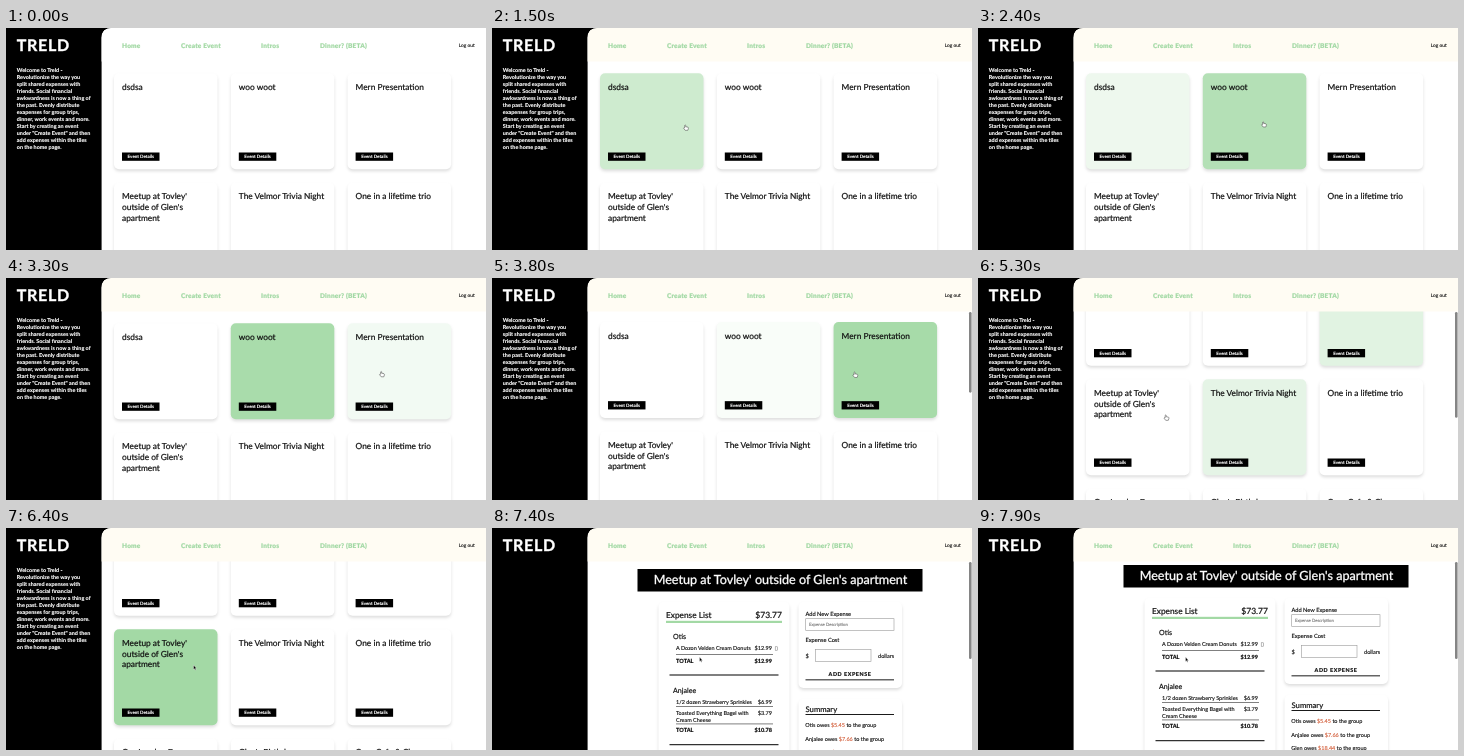
An HTML page for the animation above (8 s loop, 480x222 px).

```html
<!DOCTYPE html>
<html lang="en">
<meta charset="utf-8">
<title>Shared expenses</title>
<style>
  html, body { margin: 0; width: 100%; height: 100%; overflow: hidden; background: #000; }
  svg { display: block; width: 480px; height: 222px; }
  text { font-family: Lato, sans-serif; text-rendering: geometricPrecision; white-space: pre; }
  .panel { fill: #fff; filter: drop-shadow(0 2px 1.8px rgba(0, 0, 0, .13)); }
</style>
<body>
<script>
const GREEN = '#a3d9a5';
const GREEN_RGB = [163, 217, 165];
const LOOP = 8000;

// A hairline stroke gives the text a medium weight
const text = (x, y, str, size, weight = 400, fill = '#111', attrs = '') =>
  `<text x="${x}" y="${y}" font-size="${size}" font-weight="${weight}" fill="${fill}"
    stroke="${fill}" stroke-width="${size * .025}" ${attrs}>${str}</text>`;
const lines = (x, y, str, size, leading, weight, fill) =>
  str.split('|').map((s, i) => text(x, y + i * leading, s, size, weight, fill)).join('');
const rect = (x, y, w, h, attrs = '') =>
  `<rect x="${x}" y="${y}" width="${w}" height="${h}" ${attrs}/>`;
const panel = (x, y, w, h) => rect(x, y, w, h, 'rx="5" class="panel"');
const field = (x, y, w, h) => rect(x, y, w, h, 'fill="#fff" stroke="#999" stroke-width=".6"');
const END = 'text-anchor="end"';
const MIDDLE = 'text-anchor="middle"';

const titles = ["dsdsa", "woo woot", "Mern Presentation",
  "Meetup at Tovley'|outside of Glen's|apartment", "The Velmor Trivia Night", "One in a lifetime trio",
  "Our London Dance", "Glen's Birthday", "Cozy Cafe &amp; Chess"];

const card = (title, i) => {
  const x = 108 + i % 3 * 116.8, y = 45.3 + Math.floor(i / 3) * 109.5;
  return rect(x, y, 103.5, 96, 'rx="5" class="panel card"') +
    lines(x + 8, y + 16.6, title, 8.35, 10.7) +
    rect(x + 8, y + 79.2, 37.5, 8.3) +
    text(x + 26.8, y + 85, 'Event Details', 4.5, 700, '#fff', MIDDLE);
};

const price = (y, amount, weight) => text(280, y, amount, 5.6, weight, '#111', END);
const item = (y, name, amount) => lines(184, y, name, 5.5, 7) + price(y, amount);
const total = (y, amount) => rect(184, y - 8.5, 97, .5) +
  text(184, y, 'TOTAL', 5.6, 800) + price(y, amount, 800) + rect(177.5, y + 12, 109, 1);
const owes = (y, name, amount) => text(313.3, y,
  `${name} owes <tspan fill="#d4623f" stroke="#d4623f">${amount}</tspan> to the group`, 5.5);

const eventPage = rect(145.5, 37, 285, 22.5) +
  text(288.5, 52.4, "Meetup at Tovley' outside of Glen's apartment", 12.6, 400, '#fff', MIDDLE) +
  panel(166.5, 70, 131, 190) +
  text(174, 86.3, 'Expense List', 8.3) + text(290, 86.3, '$73.77', 8.5, 400, '#111', END) +
  rect(174, 88.8, 116, 2.2, `fill="${GREEN}"`) +
  text(181, 107.3, 'Otis', 7.1) + item(118.3, 'A Dozon Velden Cream Donuts', '$12.99') +
  rect(283.2, 114.8, 2.2, 3.4, 'fill="none" stroke="#777" stroke-width=".5"') +
  total(130.5, '$12.99') +
  text(181, 160.5, 'Anjalee', 7.1) + item(172, '1/2 dozen Strawberry Sprinkles', '$6.99') +
  rect(184, 174.3, 97, .5) + item(182.5, 'Toasted Everything Bagel with|Cream Cheese', '$3.79') +
  total(200.2, '$10.78') +
  panel(306.5, 70, 103.5, 86) +
  text(313.5, 83.5, 'Add New Expense', 5.7) + field(313.7, 86.7, 88.3, 11.6) +
  text(317, 94.2, 'Expense Description', 4.3, 400, '#777') +
  text(313.5, 110, 'Expense Cost', 5.7) + text(313.5, 125.6, '$', 5.7) + field(323.3, 117.3, 55.7, 12) +
  text(386, 125.6, 'dollars', 5.6) +
  text(358, 143.7, 'ADD EXPENSE', 5.4, 800, '#111', MIDDLE + ' letter-spacing=".55"') +
  rect(313.5, 147.4, 88.5, .9) +
  panel(306.5, 167, 103.5, 90) + text(313.5, 179.5, 'Summary', 7.7) + rect(313.5, 182, 88.5, .9) +
  owes(195, 'Otis', '$5.45') + owes(208.5, 'Anjalee', '$7.66') + owes(222, 'Glen', '$18.44');

const intro = `Welcome to Treld -|Revolutionize the way you|split shared expenses with|friends. Social financial|\
awkwardness is now a thing of|the past. Evenly distribute|exapenses for group trips,|dinner, work events and more.|\
Start by creating an event|under "Create Event" and then|add expenses within the tiles|on the home page.`;

const nav = [[116, 'Home'], [175, 'Create Event'], [255, 'Intros'], [314, 'Dinner? (BETA)']]
  .map(([x, s]) => text(x, 20, s, 6.5, 900, GREEN, 'letter-spacing=".18"')).join('');

document.body.innerHTML = `<svg viewBox="0 0 480 222">
  <clipPath id="sheet"><path d="M95.6 222V10Q95.6 0 105.6 0H480V222Z"/></clipPath>
  <rect width="480" height="222"/>
  ${text(10.8, 23.3, 'TRELD', 16, 700, '#fff', 'letter-spacing=".7"')}
  <g id="intro">${lines(10.8, 44, intro, 5.45, 7, 700, '#fff')}</g>
  <g clip-path="url(#sheet)">
    <rect x="95" width="385" height="222" fill="#fff"/>
    <g id="home">${titles.map(card).join('')}</g>
    <g id="event">${eventPage}</g>
    <rect id="header" x="95" width="385" height="33.5"/>
    ${nav}${text(452.8, 18.8, 'Log out', 4.8)}
    <rect id="bar" x="477" y="34" width="2.6" rx="1.3" fill="#858585"/>
  </g>
  <g id="cursor" stroke-linejoin="round">
    <path id="hand" d="M-1.3 .2V-2.2Q-.8 -3 -.3 -2.2V-.8L2 -.3Q2.6 0 2.4 1L1.8 2.8H-.8L-2.5 .6Q-2.2 -.2 -1.3 .2Z"
      fill="#fff" stroke="#555" stroke-width=".6"/>
    <path id="arrow" d="M-1 -2.4V2L0 1.2L.7 2.7L1.4 2.4L.8 1H2.1Z" stroke="#fff" stroke-width=".4"/>
  </g>
</svg>`;

const $ = id => document.getElementById(id);
const cards = [...document.querySelectorAll('.card')];
const show = (id, on) => $(id).setAttribute('display', on ? 'inline' : 'none');
const move = (id, x, y) => $(id).setAttribute('transform', `translate(${x} ${y})`);
const clamp = v => Math.min(1, Math.max(0, v));
const smooth = v => (v = clamp(v), v * v * (3 - 2 * v));
const fade = dt => 1 - (1 - clamp(dt / 700)) ** 2;

// Start and end of each burst of updates, in tenths of a second
const bursts = [[2, 5], [7, 9], [12, 15], [18, 20], [22, 25], [27, 30], [33, 35], [37, 40], [42, 42],
  [44, 45], [47, 49], [52, 53], [55, 55], [57, 60], [62, 65], [68, 70], [74, 75], [78, 79]];
const hold = t => {
  const step = Math.floor(t / 100);
  const burst = bursts.filter(b => b[0] <= step).pop();
  return burst ? Math.min(step, burst[1]) * 100 : 0;
};

// Card index, pointer enters, pointer leaves
const hovers = [[0, 1280, 2000], [1, 2000, 3275], [2, 3250, 5000], [4, 4770, 4980], [3, 5350, 9000]];

// Time, x, y
const path = [[1200, 182, 104], [1500, 194, 99.5], [1800, 197, 99], [2000, 230, 97], [2500, 300, 96],
  [3000, 376, 96], [3500, 376, 96], [4200, 346.5, 97.5], [4500, 335, 101], [4900, 250, 130],
  [5300, 188.5, 139.5], [6700, 188.5, 139.5], [7000, 208.5, 131.5], [8000, 208.5, 131.5]];
const pointer = t => {
  const i = Math.max(1, path.findIndex(p => p[0] >= t));
  const [a, b] = [path[i - 1], path[i]];
  const k = clamp((t - a[0]) / (b[0] - a[0]));
  return [a[1] + (b[1] - a[1]) * k, a[2] + (b[2] - a[2]) * k];
};

function draw(t) {
  const scroll = 53.5 * smooth((t - 3710) / 950);
  const onHome = t < 6500, onEvent = t >= 7400;

  show('intro', onHome);
  show('home', onHome);
  show('event', onEvent);
  move('home', 0, -scroll);
  move('event', 0, 4 * (1 - clamp((t - 7700) / 200)));
  $('header').setAttribute('fill', t < 700 ? '#fff' : '#fffcf3');

  for (const [i, enter, leave] of hovers) {
    const level = fade(t - enter) * (1 - fade(t - leave));
    cards[i].style.fill = `rgb(${GREEN_RGB.map(c => 255 + (c - 255) * level)})`;
  }

  show('bar', t >= 3800 && t < 5800 || onEvent);
  $('bar').setAttribute('height', onEvent ? 97 : 80 + scroll * .48);

  show('cursor', t >= 1200);
  show('hand', t < 6200);
  show('arrow', t >= 6200);
  move('cursor', ...pointer(t));
}

function tick(now) {
  draw(hold(now % LOOP));
  requestAnimationFrame(tick);
}
draw(0);
requestAnimationFrame(tick);
</script>
</body>
</html>
```
